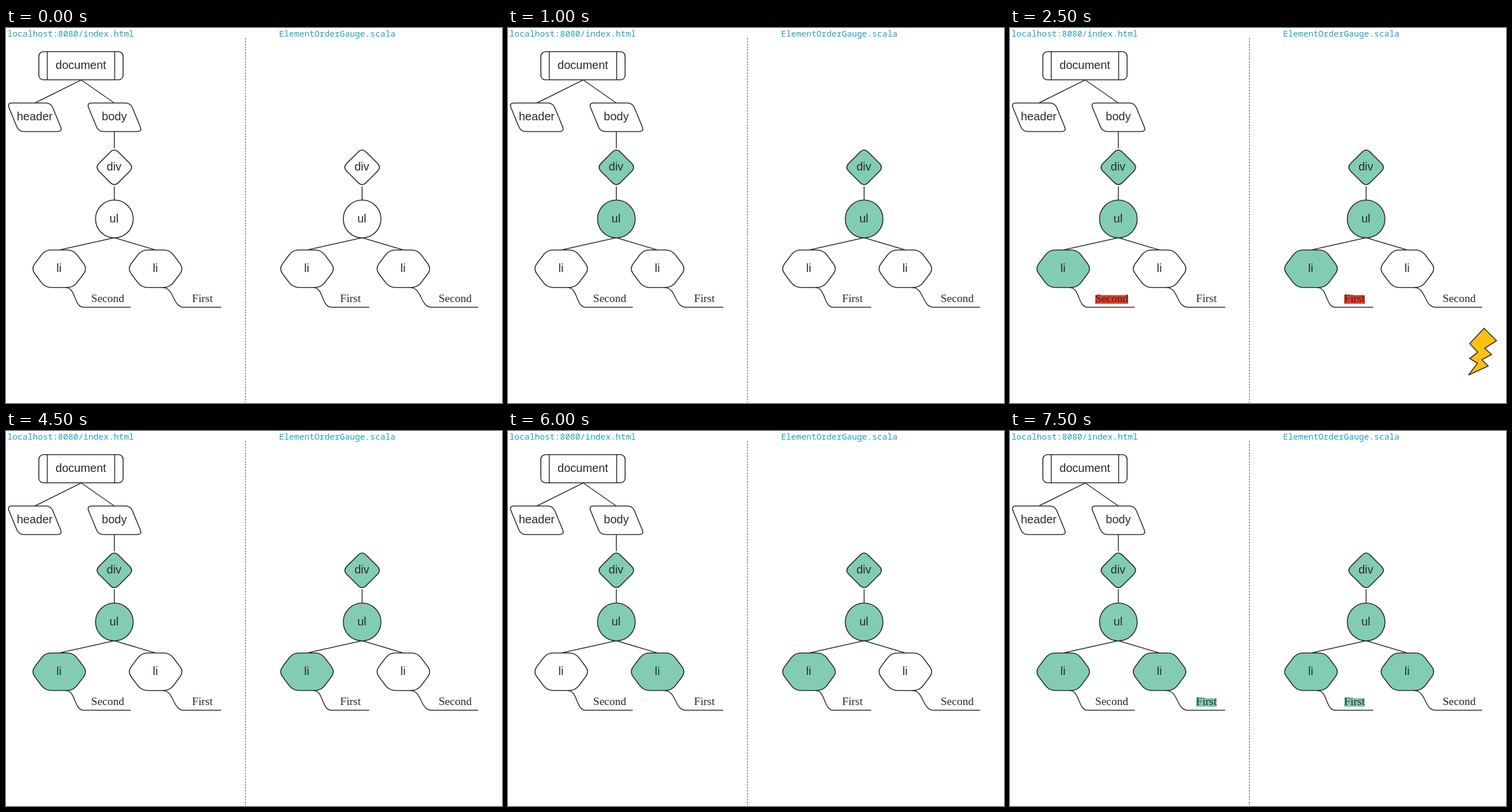
Write an HTML page that moves like this. It is 861x650 px and loops after 8 s.

```html
<!DOCTYPE html>
<html lang="en">
<head>
<meta charset="utf-8">
<title>Element order</title>
<style>
  html, body { margin: 0; width: 100%; height: 100%; overflow: hidden; background: #fff; }
  svg { display: block; width: 861px; height: 650px; }
  .shape { fill: #fff; stroke: #2a2a2a; stroke-width: 1.6; stroke-linejoin: round; }
  .line { fill: none; stroke: #2a2a2a; stroke-width: 1.5; stroke-linecap: round; }
  .on { fill: #82ccb3; }
  text { fill: #2a2a2a; text-anchor: middle; }
  .label { font: 20px "Liberation Sans", Arial, sans-serif; }
  .leaf { font: 19.5px "Liberation Serif", "Times New Roman", serif; }
  .file { font: 14.65px "Noto Sans Mono", Consolas, monospace; fill: #1f9fc3; text-anchor: start; }
</style>
</head>
<body>
<svg id="stage" viewBox="0 0 861 650"></svg>
<script>
const stage = document.getElementById('stage');

function add(tag, attrs, text = '') {
  const el = document.createElementNS('http://www.w3.org/2000/svg', tag);
  for (const key in attrs) el.setAttribute(key, attrs[key]);
  el.textContent = text;
  return stage.appendChild(el);
}

const line = d => add('path', { class: 'line', d });
const write = (cls, x, y, text) => add('text', { class: cls, x, y }, text);

// Closed polygon whose corners are cut back and bent
function polygon(points, cut) {
  const toward = ([x, y], [u, v]) => {
    const k = cut / Math.hypot(u - x, v - y);
    return [x + (u - x) * k, y + (v - y) * k];
  };
  const n = points.length;
  const d = points.map((p, i) =>
    `${i ? 'L' : 'M'}${toward(p, points[(i + n - 1) % n])} Q${p} ${toward(p, points[(i + 1) % n])}`);
  return add('path', { class: 'shape', d: d.join(' ') + 'Z' });
}

function slanted(x, text) {
  polygon([[x - 48, 130], [x + 28, 130], [x + 48.5, 179.5], [x - 27.5, 179.5]], 9);
  write('label', x, 160, text);
}

function item(x) {
  const y = 417.3, h = 32.5;
  const shape = polygon([[x - 49, y], [x - 24.5, y - h], [x + 24.5, y - h],
    [x + 49, y], [x + 24.5, y + h], [x - 24.5, y + h]], 11);
  write('label', x - .5, 422.5, 'li');
  return shape;
}

function leaf(from, start, end, x, text) {
  const mid = (from + start) / 2;
  line(`M${from} 450C${mid + 2} 450 ${mid - 2} 484 ${start} 484H${end}`);
  const w = text === 'First' ? 36 : 57;
  const mark = add('rect', { x: x - w / 2, y: 463, width: w, height: 15 });
  write('leaf', x, 474.5, text);
  return mark;
}

// The branch shared by both sides, with div centred on x
function branch(x) {
  line(`M${x} 275V298M${x - 95.5} 384.8L${x} 363.5L${x + 71.5} 384.8`);
  const r = 33.5, y = 241.5;
  const div = polygon([[x, y - r], [x + r, y], [x, y + r], [x - r, y]], 10);
  write('label', x - .5, 247, 'div');
  const ul = add('circle', { class: 'shape', cx: x, cy: 331, r: 32.7 });
  write('label', x - .5, 336.5, 'ul');
  return { div, ul, first: item(x - 95.7), second: item(x + 71.6) };
}

write('file', 2.5, 15, 'localhost:8080/index.html');
write('file', 474, 15, 'ElementOrderGauge.scala');
add('path', { d: 'M415.6 17V649', stroke: '#555', 'stroke-width': 1.1, 'stroke-dasharray': '3 2' });

line('M50 130L130.5 90L188 130M188.1 180V208');
add('rect', { class: 'shape', x: 57, y: 41, width: 146.3, height: 48.8, rx: 8 });
line('M71.6 41V89.8M188.6 41V89.8');
write('label', 130, 70.5, 'document');
slanted(49.8, 'header');
slanted(188, 'body');

const left = branch(188.1);
const right = branch(618.2);
const marks = [
  leaf(104, 135, 216, 176.5, 'Second'),
  leaf(272, 309, 373, 341, 'First'),
  leaf(534, 565, 630, 598, 'First'),
  leaf(702, 739, 819, 779.7, 'Second')
];
const bolt = add('path', {
  class: 'shape', style: 'fill:#fdc010; stroke-linejoin:miter',
  d: 'M823 520.5L844.5 542L824 555L836 566L819 575L830 586L796 601.5L811.5 581L798 573L812 562L798 547Z'
});

const light = (shape, on) => shape.classList.toggle('on', on);
const paint = (mark, color) => mark.setAttribute('fill', color || 'none');

function draw(t) {
  const within = (a, b) => t >= a && t < b;
  for (const side of [left, right]) {
    light(side.div, t >= 500);
    light(side.ul, t >= 1000);
  }
  const mismatch = within(1500, 5000);
  light(left.first, mismatch || t >= 7500);
  light(left.second, t >= 6000);
  light(right.first, mismatch || t >= 6000);
  light(right.second, t >= 7500);

  const red = within(2000, 4500) && '#e83a2a';
  const green = t >= 6500 && '#82ccb3';
  paint(marks[0], red);
  paint(marks[1], green);
  paint(marks[2], red || green);
  paint(marks[3]);
  bolt.style.display = within(2500, 4500) ? '' : 'none';
}

const begin = performance.now();
function tick() {
  draw((performance.now() - begin) % 8000);
  requestAnimationFrame(tick);
}
tick();
</script>
</body>
</html>
```
